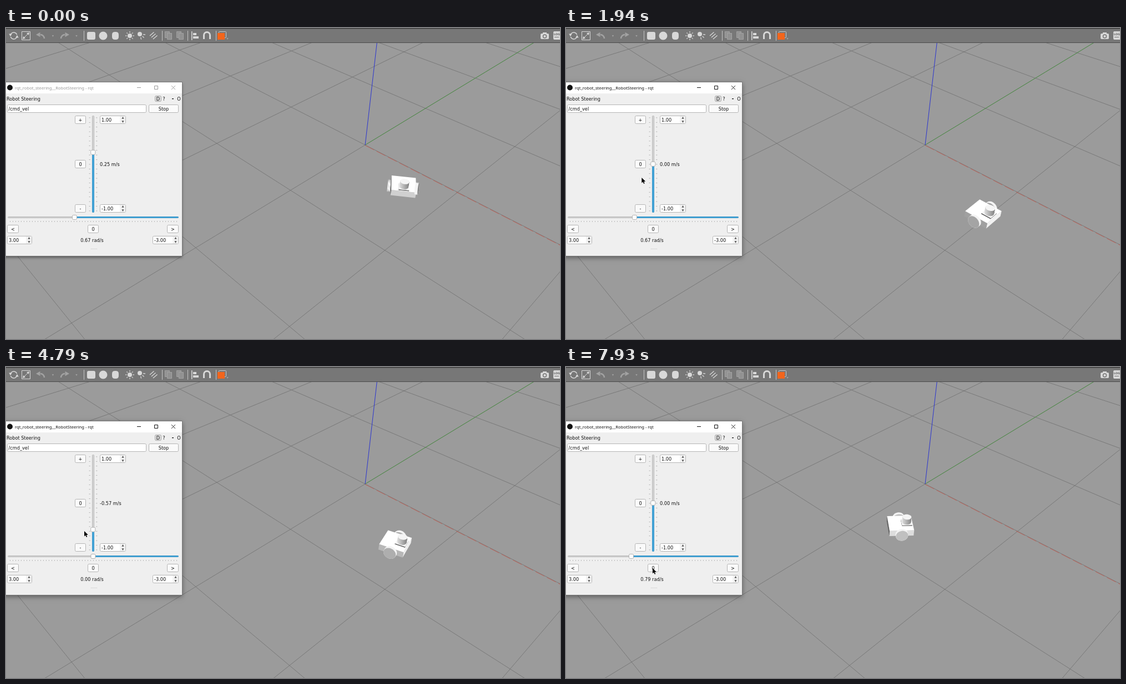
An HTML page with a canvas that plays this animation: 998x561 px, repeating every 7.99 s.

```html
<!DOCTYPE html>
<html lang="en">
<head>
<meta charset="utf-8">
<title>Robot steering</title>
<style>
html, body { margin: 0; width: 100%; height: 100%; overflow: hidden; background: #9b9b9b; }
canvas { display: block; }
</style>
</head>
<body>
<canvas id="stage" width="998" height="561"></canvas>
<script>
const ctx = document.getElementById('stage').getContext('2d');
const LOOP = 7.99;
const UI_FONT = '8.2px "DejaVu Sans", sans-serif';
const TITLE_FONT = '7.65px "Noto Sans", sans-serif';
const { PI, sin, cos, min, max } = Math;

// Motion: all times are in seconds.
const clamp = (t, from, to) => max(from, min(to, t));
const ramp = (t, from, to) => clamp((t - from) / (to - from), 0, 1);
const ease = (t, from, to) => { const f = ramp(t, from, to); return f * f * (3 - 2 * f); };
const between = (t, from, to) => t >= from && t < to;

const DRAG = .45;
const LINEAR_ZERO = 1.54, ANGULAR_ZERO = 2.64, STOP_TIME = 5.5;
const LINEAR_DRAG_END = 4.05, ANGULAR_DRAG_END = 6.68;

function linearSpeed(t) {
  if (t < LINEAR_ZERO) return .25;
  return t < STOP_TIME ? -.57 * ease(t, LINEAR_DRAG_END - DRAG, LINEAR_DRAG_END) : 0;
}
function angularSpeed(t) {
  return t < ANGULAR_ZERO ? .67 : .79 * ease(t, ANGULAR_DRAG_END - DRAG, ANGULAR_DRAG_END);
}
const linearY = t => 245.3 - linearSpeed(t) * 84;
const angularX = t => 157 - angularSpeed(t) * 50;

// Drive an arc, spin in place, reverse straight, spin again.
function robotPose(t) {
  const start = -.942, radius = .425;
  const heading = time => start + 1.239 * ramp(time, 0, 2.5) + .565 * ramp(time, 6.28, LOOP);
  const arcEnd = heading(min(t, 1.75));
  const back = .46 * clamp(t - 4.3, 0, 1.53);
  return {
    u: .695 + radius * (sin(arcEnd) - sin(start)) - back * cos(heading(4)),
    v: .372 + radius * (cos(arcEnd) - cos(start)) + back * sin(heading(4)),
    heading: heading(t)
  };
}

// The pointer glides to each stop, arriving at the given time.
const STOPS = [
  [.7, 148, 470], [1.25, 131, 243], [2.25, 154, 359], [3.45, 157, 245], [LINEAR_DRAG_END, 157, 293],
  [4.75, 141, 296], [5.45, 131, 243], [5.72, 160, 253], [6.1, 157, 339],
  [ANGULAR_DRAG_END, 118, 339], [6.92, 138, 258], [7.85, 156, 363]
];
function pointer(t) {
  return STOPS.reduce(([x, y, last], [time, nx, ny]) => {
    const f = ease(t, max(last, time - DRAG), time);
    return [x + (nx - x) * f, y + (ny - y) * f, time];
  }, [148, 480, 0]);
}
const pressed = t =>
  [LINEAR_ZERO, ANGULAR_ZERO, STOP_TIME].some(click => between(t, click - .04, click + .1)) ||
  [LINEAR_DRAG_END, ANGULAR_DRAG_END].some(end => between(t, end - DRAG, end));

// Drawing helpers
function poly(points, fill, stroke, width = 1) {
  ctx.beginPath();
  points.forEach(p => ctx.lineTo(p[0], p[1]));
  if (fill) { ctx.closePath(); ctx.fillStyle = fill; ctx.fill(); }
  if (stroke) { ctx.strokeStyle = stroke; ctx.lineWidth = width; ctx.stroke(); }
}
function rect(x, y, w, h, fill) { ctx.fillStyle = fill; ctx.fillRect(x, y, w, h); }
function frame(x, y, w, h, fill, stroke, r = 2) {
  ctx.beginPath();
  ctx.roundRect(x + .5, y + .5, w - 1, h - 1, r);
  if (fill) { ctx.fillStyle = fill; ctx.fill(); }
  ctx.strokeStyle = stroke; ctx.lineWidth = 1; ctx.stroke();
}
function arc(x, y, r, fill, stroke, from = 0, to = 7, width = 1.5) {
  ctx.beginPath();
  ctx.arc(x, y, r, from, to);
  if (fill) { ctx.fillStyle = fill; ctx.fill(); }
  if (stroke) { ctx.strokeStyle = stroke; ctx.lineWidth = width; ctx.stroke(); }
}
const triangle = (x, y, r, angle, fill) =>
  poly([0, 1, 2].map(i => [x + r * cos(angle + i * 2 * PI / 3), y + r * sin(angle + i * 2 * PI / 3)]), fill);
function text(s, x, y, align = 'left', font = UI_FONT, color = '#111') {
  ctx.font = font; ctx.textAlign = align; ctx.fillStyle = color;
  ctx.fillText(s, x, y);
}
const gray = b => { const n = Math.round(255 * min(1, b)); return `rgb(${n},${n},${n})`; };

// Perspective camera: ground axes u and v, height z
function project(u, v, z = 0) {
  const w = 1 - .1101 * u - .1059 * v - .1209 * z;
  return [(647 + 76.9 * u - 188.8 * v - 60 * z) / w, (211 + 52.7 * u + 50.7 * v - 183.8 * z) / w];
}

function drawGround() {
  rect(0, 0, 998, 561, '#9b9b9b');
  for (let i = -10; i <= 10; i++) {
    const vEnd = min(10, (.85 - .1101 * i) / .1059);
    const uEnd = min(10, (.85 - .1059 * i) / .1101);
    poly([project(i, -10), project(i, vEnd)], null, '#707070', .8);
    poly([project(-10, i), project(uEnd, i)], null, '#707070', .8);
  }
  poly([project(0, 0), project(0, -4)], null, 'rgba(50,150,40,.75)', .9);
  ctx.setLineDash([18, 5]);
  poly([[647, 211.8], [998, 391.8]], null, 'rgba(215,75,60,.8)', .8);
  ctx.setLineDash([]);
  poly([project(0, 0), project(0, 0, 1.1)], null, '#2b35d0', 1);
}

function drawRobot({ u, v, heading }) {
  const c = cos(heading), s = sin(heading);
  const local = (f, l, z) => project(u + f * c - l * s, v - f * s - l * c, z);
  const ring = point => Array.from({ length: 28 }, (_, i) => point(cos(i * PI / 14), sin(i * PI / 14)));

  function box(f, half, z0, z1, dim, top) {
    const corners = [[1, 1], [1, -1], [-1, -1], [-1, 1]].map(([i, j]) => [f + i * half, j * half]);
    corners.forEach((p, i) => {
      const q = corners[(i + 1) % 4];
      const face = [local(...p, z0), local(...q, z0), local(...q, z1), local(...p, z1)];
      const [A, B, , D] = face;
      const facing = (B[0] - A[0]) * (D[1] - A[1]) - (B[1] - A[1]) * (D[0] - A[0]);
      if (facing > 0) poly(face, gray(dim * (.62 + .33 * cos(heading - i * PI / 2))));
    });
    poly(corners.map(p => local(...p, z1)), top);
  }
  const byDepth = (m, n) => local(0, m, .085)[1] - local(0, n, .085)[1];
  function wheel(side) {
    const disc = l => ring((x, z) => local(x * .05, l, .085 + z * .052));
    const [far, near] = [side * .1, side * .125].sort(byDepth);
    for (let i = 0; i <= 5; i++) poly(disc(far + (near - far) * i / 5), '#f4f4f4');
    poly(disc(near), gray(.64 + .15 * cos(heading - PI / 2)));
  }

  const [farSide, nearSide] = [1, -1].sort(byDepth);
  wheel(farSide);
  box(0, .1, .065, .12, 1, '#fff');
  wheel(nearSide);
  box(.05, .042, .12, .13, .58, '#f4f4f4');

  const [x, y] = local(.05, 0, .13);
  const shade = ctx.createLinearGradient(x - 9, y, x + 9, y);
  shade.addColorStop(0, '#e2e2e2');
  shade.addColorStop(1, '#858585');
  const lidar = z => ring((f, l) => local(.05 + f * .036, l * .036, z));
  for (let z = .13; z < .18; z += .004) poly(lidar(z), shade);
  poly(lidar(.182), '#f5f5f5');
}

function drawToolbar() {
  const light = '#d8d8d8', dim = '#a2a2a2', bar = '#777';
  rect(0, 0, 998, 27, bar);
  rect(0, 0, 998, 1.5, '#3d3d3d');
  rect(0, 26, 998, 1, '#4c4c4c');
  for (const x of [140, 281, 327, 378]) rect(x, 5, 1, 18, '#c4c4c4');

  for (const side of [0, PI]) {
    arc(14, 14, 6, null, light, side + .3, side + 2.8);
    triangle(14 + 6 * cos(side), 14 + 2 * cos(side), 3.2, side - PI / 2, light);
    triangle(36 + 4 * cos(side), 14 - 4 * cos(side), 3, side - PI / 4, light);
  }
  frame(28, 6, 16, 16, null, light, 0);
  poly([[32, 18], [40, 10]], null, light);

  // Undo and redo mirror each other.
  for (const [x, d] of [[63, 1], [105, -1]]) {
    triangle(x - 4 * d, 12, 5, d > 0 ? PI : 0, dim);
    arc(x - d, 19, 7, null, dim, d > 0 ? -PI / 2 : -PI, d > 0 ? 0 : -PI / 2, 2.6);
    triangle(x + 21.5 * d + (d < 0 ? 43.5 : 0), 14, 2, PI / 2, dim);
  }

  frame(146, 7, 15, 14, light, light, 2);
  arc(175, 14, 7.5, light);
  frame(191, 7, 12, 14, light, light, 4);

  arc(223, 14, 4, light);
  arc(241, 11, 4, light);
  const ray = (x, y, angle, from, to) =>
    poly([from, to].map(r => [x + r * cos(angle), y + r * sin(angle)]), null, light, 1.3);
  for (let i = 0; i < 8; i++) ray(223, 14, i * PI / 4, 5.5, 8);
  for (let i = 0; i < 3; i++) {
    ray(241, 11, .1 + i * .6, 6, 10);
    ray(259 + i * 3, 14 + i * 3, -.72, 0, 10);
  }

  for (const x of [286, 307]) {
    frame(x, 6, 9, 12, '#929292', dim, 0);
    frame(x + 4, 9, 9, 12, '#929292', dim, 0);
  }
  rect(334, 6, 1.5, 16, light);
  rect(337, 9, 6, 4, light);
  rect(337, 15, 10, 4, light);
  arc(362, 13, 5.5, null, light, PI, 2 * PI, 3);
  for (const x of [355, 366]) rect(x, 13, 3, 7, light);
  frame(383, 6, 14, 12, null, '#c8c8c8', 1);
  rect(381, 9, 13, 12, '#f2651c');
  triangle(399, 19, 2, PI / 2, dim);

  rect(967, 8, 7, 3, light);
  frame(963, 10, 15, 10, light, light, 1);
  arc(970.5, 15, 3, null, bar);
  frame(986, 6, 15, 15, light, light, 1);
  text('LOG', 992.5, 13, 'center', 'bold 5px "DejaVu Sans", sans-serif', '#666');
  rect(988, 16, 8, 1, bar);
}

function button(label, x, y, w, down) {
  frame(x, y, w, 15, down ? '#c9c9c9' : '#fafafa', '#b5b5b5');
  text(label, x + w / 2, y + 10.7, 'center');
}
function spinBox(label, x, y, w) {
  frame(x, y, w, 15, '#fff', '#b5b5b5');
  rect(x + w - 11, y + 1, 10, 13, '#f3f3f3');
  text(label, x + 3, y + 10.7);
  for (const d of [-1, 1]) triangle(x + w - 5.5, y + 7.5 + 3 * d, 2.4, d * PI / 2, '#555');
}
function slider(x, y, w, h, filled, handleX, handleY) {
  frame(x, y, w, h, '#d6d6d6', '#b8b8b8', 1);
  frame(...filled, '#45a8dc', '#3a94c6', 1);
  frame(handleX - 4.5, handleY - 4.5, 9, 9, '#fff', '#b0b0b0');
}

function drawWindow(t) {
  const active = t > LINEAR_ZERO - .04, ink = active ? '#111' : '#999';
  const isDown = click => between(t, click - .04, click + .1);
  ctx.save();
  ctx.shadowColor = 'rgba(0,0,0,.45)';
  ctx.shadowBlur = active ? 9 : 5;
  ctx.shadowOffsetY = 2;
  rect(-5, 98, 322, 314, '#efefef');
  ctx.restore();
  rect(0, 98, 317, 20, '#fff');
  poly([[0, 97.5], [317.5, 97.5], [317.5, 411.5], [0, 411.5]], null, '#777');

  arc(7, 107.5, 5, '#111');
  text('rqt_robot_steering__RobotSteering - rqt', 16, 110.5, 'left', TITLE_FONT, ink);
  rect(236, 107, 7, 1, ink);
  frame(267, 104, 7, 7, null, ink, 0);
  for (const d of [-3.5, 3.5]) poly([[301.5 - d, 104], [301.5 + d, 111]], null, ink, .9);

  text('Robot Steering', 1, 130.5);
  frame(268, 122, 12, 11, '#dcdcdc', '#a8a8a8');
  text('D', 273.8, 130.5, 'center');
  text('?', 284.5, 130.5, 'center');
  rect(299, 127, 3, 1.3, '#111');
  text('O', 311.5, 130.5, 'center');
  frame(2, 138, 251, 15, '#fff', '#b5b5b5');
  text('/cmd_vel', 4.5, 148.7);
  button('Stop', 257, 138, 54);

  button('+', 124, 158, 20);
  button('0', 124, 238, 20, isDown(LINEAR_ZERO) || isDown(STOP_TIME));
  button('-', 124, 318, 20);
  spinBox('1.00', 169, 158, 47);
  spinBox('-1.00', 169, 318, 47);
  text(linearSpeed(t).toFixed(2).replace('-0.00', '0.00') + ' m/s', 169, 248.5);
  for (let i = 0; i <= 20; i++)
    for (const x of [149.5, 162]) rect(x, 161.5 + i * 8.4, 2.5, .8, '#aaa');
  const y = linearY(t);
  slider(155, 158, 4, 175, [155, y, 4, 333 - y], 156.8, y);

  for (let x = 7; x <= 307; x += 5) rect(x, 348, .8, 2, '#aaa');
  const x = angularX(t);
  slider(3, 340, 308, 3, [x, 340, 311 - x, 3], x, 341.5);

  button('<', 2, 355, 21);
  button('0', 147, 355, 20, isDown(ANGULAR_ZERO));
  button('>', 290, 355, 21);
  spinBox('3.00', 2, 375, 45);
  spinBox('-3.00', 264, 375, 47);
  text(angularSpeed(t).toFixed(2) + ' rad/s', 155, 386, 'center');
  for (let i = 0; i < 6; i++) rect(153 + 2 * i, 398, 1, 1, '#c2c2c2');
}

function drawPointer(t) {
  if (t < .6) return;
  const [x, y] = pointer(t);
  if (pressed(t)) arc(x + 1, y + 2, 8.7, 'rgba(228,222,40,.75)');
  const arrow = [[0, 0], [0, 9.5], [2.2, 7.5], [3.8, 11], [5.3, 10.3], [3.8, 7], [6.8, 6.7]];
  poly(arrow.map(([dx, dy]) => [x + dx, y + dy]), '#000');
}

function render() {
  const t = performance.now() / 1000 % LOOP;
  drawGround();
  drawRobot(robotPose(t));
  drawToolbar();
  drawWindow(t);
  drawPointer(t);
  requestAnimationFrame(render);
}
render();
</script>
</body>
</html>
```
